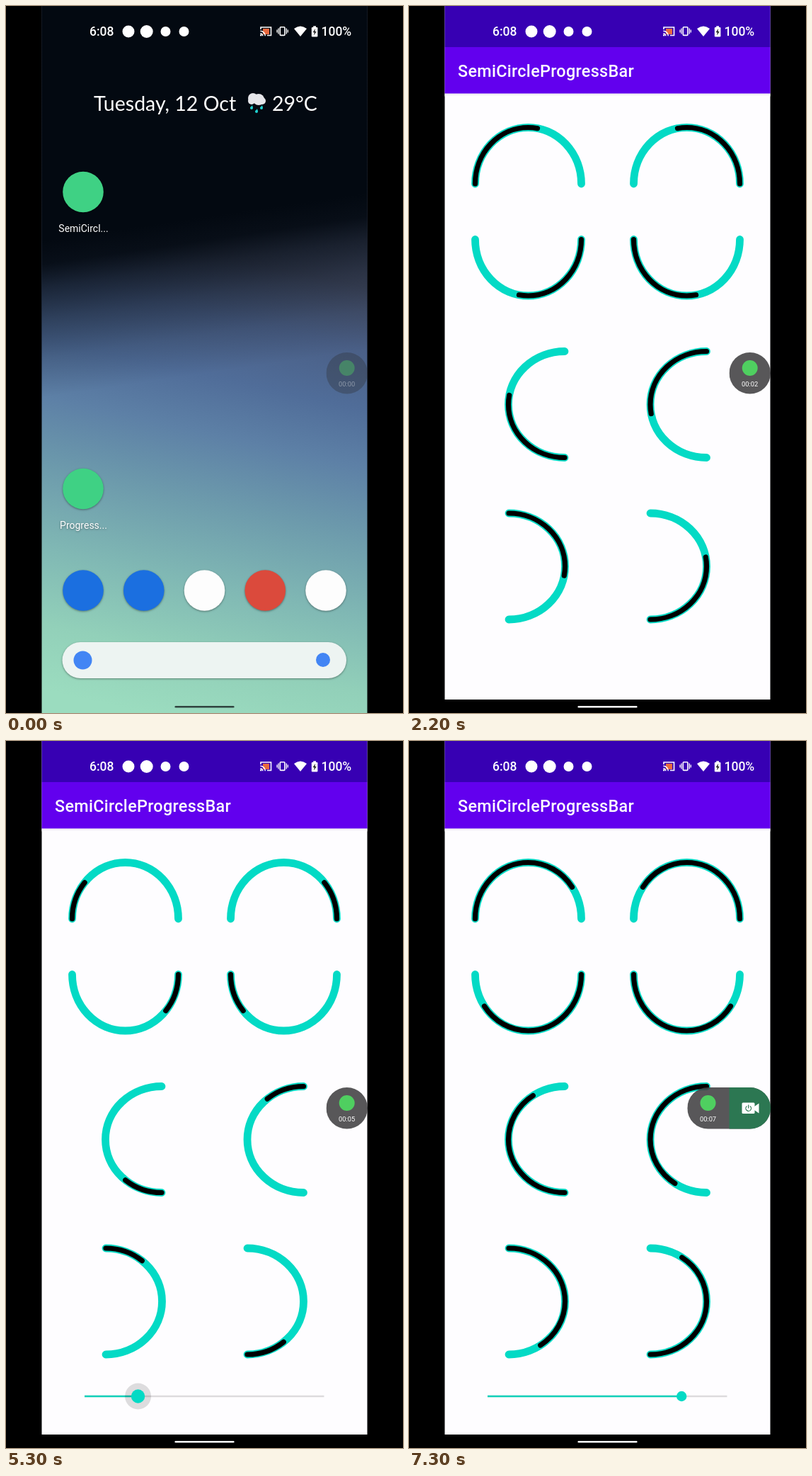
Recreate the animation shown at these times as an HTML page with a canvas. Size 561 by 998 pixels, loop 7.4 s.

```html
<!DOCTYPE html>
<html lang="en">
<head>
<meta charset="utf-8">
<title>SemiCircleProgressBar</title>
<style>
  html, body { margin: 0; width: 100%; height: 100%; overflow: hidden; background: #000; }
  canvas { display: block; width: 561px; height: 998px; }
</style>
</head>
<body>
<canvas id="stage" width="561" height="998"></canvas>
<script>
const ctx = document.getElementById('stage').getContext('2d');
const LOOP = 7400, STEP = 100;
const LEFT = 50.5, RIGHT = 510.5, WIDTH = RIGHT - LEFT, HEIGHT = 998;
const TEAL = '#03dac5', PURPLE = '#6200ee', DARK_PURPLE = '#3700b3', PAPER = '#fefdff';
const ROBOTO = 'Roboto, sans-serif', LATO = 'Lato, sans-serif';
const Q = Math.PI / 2;

const clamp = x => Math.max(0, Math.min(1, x));
const span = (t, a, b) => clamp((t - a) / (b - a));
const lerp = (a, b, u) => a + (b - a) * u;
const easeOut = u => 1 - (1 - u) ** 2;

function rect(x, y, w, h, fill) {
  ctx.fillStyle = fill;
  ctx.fillRect(x, y, w, h);
}

function disc(x, y, r, fill) {
  ctx.fillStyle = fill;
  ctx.beginPath();
  ctx.arc(x, y, r, 0, 4 * Q);
  ctx.fill();
}

function round(x, y, w, h, r, fill) {
  ctx.fillStyle = fill;
  ctx.beginPath();
  ctx.roundRect(x, y, w, h, r);
  ctx.fill();
}

function poly(points, fill) {
  ctx.fillStyle = fill;
  ctx.beginPath();
  points.forEach(([x, y]) => ctx.lineTo(x, y));
  ctx.closePath();
  ctx.fill();
}

function stroke(color, width, trace) {
  ctx.strokeStyle = color;
  ctx.lineWidth = width;
  ctx.beginPath();
  trace();
  ctx.stroke();
}

function line(x1, y1, x2, y2, color, width) {
  stroke(color, width, () => { ctx.moveTo(x1, y1); ctx.lineTo(x2, y2); });
}

function text(str, x, y, font, fill = '#fff', align = 'left') {
  ctx.font = font;
  ctx.fillStyle = fill;
  ctx.textAlign = align;
  ctx.fillText(str, x, y);
}

function gradient(x1, y1, x2, y2, stops) {
  const g = ctx.createLinearGradient(x1, y1, x2, y2);
  stops.forEach(([at, color]) => g.addColorStop(at, color));
  return g;
}

// Wallpaper: tilted blue-to-mint wash under a soft dark upper half
const sky = gradient(340, 360, 200, 998, [
  [0, '#48516a'], [0.13, '#4a5f86'], [0.26, '#506d99'], [0.38, '#5d80a6'],
  [0.53, '#6d9bac'], [0.7, '#80b8b4'], [0.86, '#92d0b9'], [1, '#9bdcbf']
]);
const SHADE = [[0, 1], [0.15, 0.93], [0.3, 0.68], [0.5, 0.42], [0.75, 0.16], [1, 0]];
const shade = gradient(264, 300, 296, 517,
  SHADE.map(([at, alpha]) => [at, `rgba(3,9,17,${alpha})`]));

function wallpaper() {
  rect(LEFT, 0, WIDTH, HEIGHT, sky);
  rect(LEFT, 0, WIDTH, HEIGHT, shade);
}

function weather() {
  [[349, 130, 7], [357, 132, 8], [347, 134, 5], [362, 134, 5]]
    .forEach(([x, y, r]) => disc(x, y, r, '#e6e6ea'));
  [[347, 144], [361, 144], [354, 149]].forEach(([x, y]) => {
    disc(x, y, 2, '#1fd0cf');
    poly([[x - 2, y], [x + 2, y], [x + 1, y - 4]], '#1fd0cf');
  });
}

function home(t) {
  const away = easeOut(span(t, 300, 650));
  ctx.save();
  ctx.globalAlpha = 1 - 0.58 * away;
  ctx.translate(0, -30 * away);

  text('Tuesday, 12 Oct', 124, 148, '28.5px ' + LATO);
  weather();
  text('29°C', 376, 148, '28.5px ' + LATO);

  ctx.save();
  ctx.shadowColor = 'rgba(0,0,0,.4)';
  ctx.shadowBlur = 3;
  ctx.shadowOffsetY = 1;
  [[262.5, 'SemiCircl...'], [681.5, 'Progress...']].forEach(([y, label]) => {
    disc(109, y, 28.8, '#3fd184');
    text(label, 109.5, y + 56, '14px ' + ROBOTO, '#fff', 'center');
  });
  ['#1b6fe0', '#1b6fe0', '#fdfdfd', '#db4a3c', '#fdfdfd']
    .forEach((color, i) => disc(109 + 85.75 * i, 825, 28.8, color));
  round(79.5, 898, 401.5, 51, 25.5, '#edf4f2');
  ctx.restore();

  disc(108.5, 923.5, 13, '#4285f4');
  disc(448, 923, 10, '#4285f4');
  ctx.restore();
}

// The launch window grows from the upper icon, each edge at its own pace
function opening(t) {
  if (t < 400) return;
  const q = easeOut(span(t, 400, 742));
  const x = lerp(LEFT, 80, (1 - q) ** 1.93);
  const y = lerp(233, 0, q ** 2.65);
  const right = lerp(138, RIGHT, q), bottom = lerp(HEIGHT, 291, (1 - q) ** 1.09);
  const w = right - x, h = bottom - y;
  const r = Math.min(w / 2, h / 2, q < 1 ? lerp(29, 54, q) : 0);
  ctx.save();
  ctx.globalAlpha = clamp(0.2 + q * 1.6);
  ctx.beginPath();
  ctx.roundRect(x, y, w, h, r);
  ctx.clip();
  rect(x, y, w, h, PAPER);
  rect(x, y, w, 57 * w / WIDTH, DARK_PURPLE);
  ctx.restore();
}

// cx, cy, rx, ry, start angle, counterclockwise
const ARCS = [
  [168.5, 251, 75, 79.5, 2 * Q, false],
  [392.5, 251, 75, 79.5, 0, true],
  [168.5, 329.5, 75, 79.5, 0, false],
  [392.5, 329.5, 75, 79.5, 2 * Q, true],
  [220, 562.5, 79.5, 75, Q, false],
  [420.5, 562.5, 79.5, 75, -Q, true],
  [141, 791, 79.5, 75, -Q, false],
  [341, 791, 79.5, 75, Q, true]
];

function semicircle([cx, cy, rx, ry, start, ccw], part, color, width) {
  const end = start + (ccw ? -2 : 2) * Q * part;
  ctx.lineCap = 'round';
  stroke(color, width, () => ctx.ellipse(cx, cy, rx, ry, 0, start, end, ccw));
  ctx.lineCap = 'butt';
}

// Dragging the slider back and forth: time, value
const DRAG = [[4320, 1], [4600, 0.79], [5250, 0.22], [6000, 0.583], [6500, 0.81]];

function slope(i) {
  const a = DRAG[i - 1], b = DRAG[i + 1], v = DRAG[i][1];
  if (!a || !b || (v - a[1]) * (b[1] - v) < 0) return 0;
  return (b[1] - a[1]) / (b[0] - a[0]);
}

function progress(t) {
  if (t < DRAG[0][0]) return span(t, 1012, 3150);
  const i = DRAG.findIndex(k => t < k[0]);
  if (i < 0) return DRAG[DRAG.length - 1][1];
  const [t0, a] = DRAG[i - 1], [t1, b] = DRAG[i];
  const d = t1 - t0, u = (t - t0) / d, v = 1 - u;
  return a * (1 + 2 * u) * v * v + b * u * u * (3 - 2 * u)
    + d * (slope(i - 1) * u * v * v - slope(i) * u * u * v);
}

function slider(p, pressed) {
  const x = lerp(111, 449.5, p);
  line(111, 925, 449.5, 925, '#dddbdd', 2.6);
  line(111, 925, x, 925, '#12d0ba', 2.6);
  if (pressed) disc(x, 925, 18.5, 'rgba(0,0,0,.13)');
  disc(x, 925, pressed ? 9.7 : 7.2, TEAL);
}

function app(t) {
  rect(LEFT, 0, WIDTH, HEIGHT, '#000');
  rect(LEFT, 0, WIDTH, 979, PAPER);
  rect(LEFT, 123.5, WIDTH, 4, gradient(0, 123.5, 0, 127.5, [[0, '#eceaf0'], [1, PAPER]]));
  rect(LEFT, 0, WIDTH, 58, DARK_PURPLE);
  rect(LEFT, 58, WIDTH, 65.5, PURPLE);
  ctx.letterSpacing = '0.29px';
  text('SemiCircleProgressBar', 69, 100, '500 23.4px ' + ROBOTO);
  ctx.letterSpacing = '0px';

  const p = progress(t);
  ARCS.forEach(arc => {
    semicircle(arc, 1, TEAL, 10.8);
    if (p > 0) semicircle(arc, p, '#000', 7.2);
  });
  if (t >= 3150) slider(p, t >= 4400 && t < 6500);
}

function statusBar() {
  const font = '500 17.5px ' + ROBOTO;
  text('6:08', 118, 42, font);
  [[173, 8.5], [198.7, 9], [225.5, 7], [251.5, 7]].forEach(([x, r]) => disc(x, 36, r, '#fff'));

  // Cast
  rect(363, 32, 9, 8, '#e8693f');
  stroke('#fff', 1.6, () => {
    ctx.moveTo(360, 33);
    ctx.lineTo(360, 30);
    ctx.lineTo(374.5, 30);
    ctx.lineTo(374.5, 41.5);
    ctx.lineTo(369, 41.5);
  });
  [3.5, 7].forEach(r => stroke('#fff', 1.5, () => ctx.arc(359.3, 42.3, r, -Q, 0)));
  disc(360.2, 41.3, 1.2, '#fff');

  // Vibrate
  stroke('#fff', 1.6, () => ctx.roundRect(387.3, 29.8, 6.6, 11.6, 1));
  [[385, 31.5, 8], [396.3, 31.5, 8], [383, 33.5, 4], [398.3, 33.5, 4]]
    .forEach(([x, y, h]) => line(x, y, x, y + h, '#fff', 1.3));

  // Wi-Fi
  ctx.fillStyle = '#fff';
  ctx.beginPath();
  ctx.moveTo(416, 43);
  ctx.lineTo(407, 32);
  ctx.quadraticCurveTo(416, 25, 425, 32);
  ctx.fill();

  // Battery
  round(431.8, 30, 8.6, 13.5, 1.2, '#fff');
  rect(434.2, 28.3, 3.8, 2.5, '#fff');
  poly([[437, 32], [433.6, 37.3], [435.7, 37.3], [435.2, 41.5], [438.6, 36], [436.6, 36]], '#222');
  text('100%', 445.5, 42, font);
}

function recorder(t) {
  const open = easeOut(span(t, 6650, 7000));
  const x = lerp(452.5, 393.3, open);
  const cx = x + 29.2;
  ctx.save();
  ctx.globalAlpha = lerp(0.4, 1, span(t, 0, 400));
  ctx.beginPath();
  ctx.roundRect(x, 489, RIGHT + 0.5 - x, 58.5, 29.2);
  ctx.clip();
  rect(x, 489, 118, 59, t < 850 ? 'rgba(46,49,56,.92)' : 'rgba(64,62,65,.87)');
  if (open > 0) {
    ctx.globalAlpha = open;
    rect(452.5, 489, 59, 59, '#2c7752');
    round(470.5, 510.5, 18, 15.5, 1.5, '#fff');
    poly([[488, 516], [494.5, 511.5], [494.5, 525.5], [488, 521]], '#fff');
    stroke('#2c7752', 1.2, () => ctx.arc(479.7, 518.5, 3.8, -0.6 * Q, 2.6 * Q));
    line(479.7, 513.5, 479.7, 518.5, '#2c7752', 1.2);
    ctx.globalAlpha = 1;
  }
  disc(cx, 511, 11, '#4fcf60');
  text('00:0' + Math.floor(t / 1000), cx, 537, '9.3px ' + ROBOTO, '#fff', 'center');
  ctx.restore();
}

function homePill(t) {
  const grey = Math.round(lerp(110, 255, span(t, 1000, 1600)));
  const color = t < 850 ? '#30433f' : `rgb(${grey},${grey},${grey})`;
  round(238.5, 988, 84, 2.6, 1.3, color);
}

function draw(t) {
  rect(0, 0, 561, HEIGHT, '#000');
  if (t < 800) {
    wallpaper();
    home(t);
    opening(t);
  } else {
    app(t);
  }
  statusBar();
  homePill(t);
  recorder(t);
}

const begin = performance.now();
function tick() {
  const t = (performance.now() - begin) % LOOP;
  draw(Math.floor(t / STEP) * STEP);
  requestAnimationFrame(tick);
}
tick();
</script>
</body>
</html>
```
